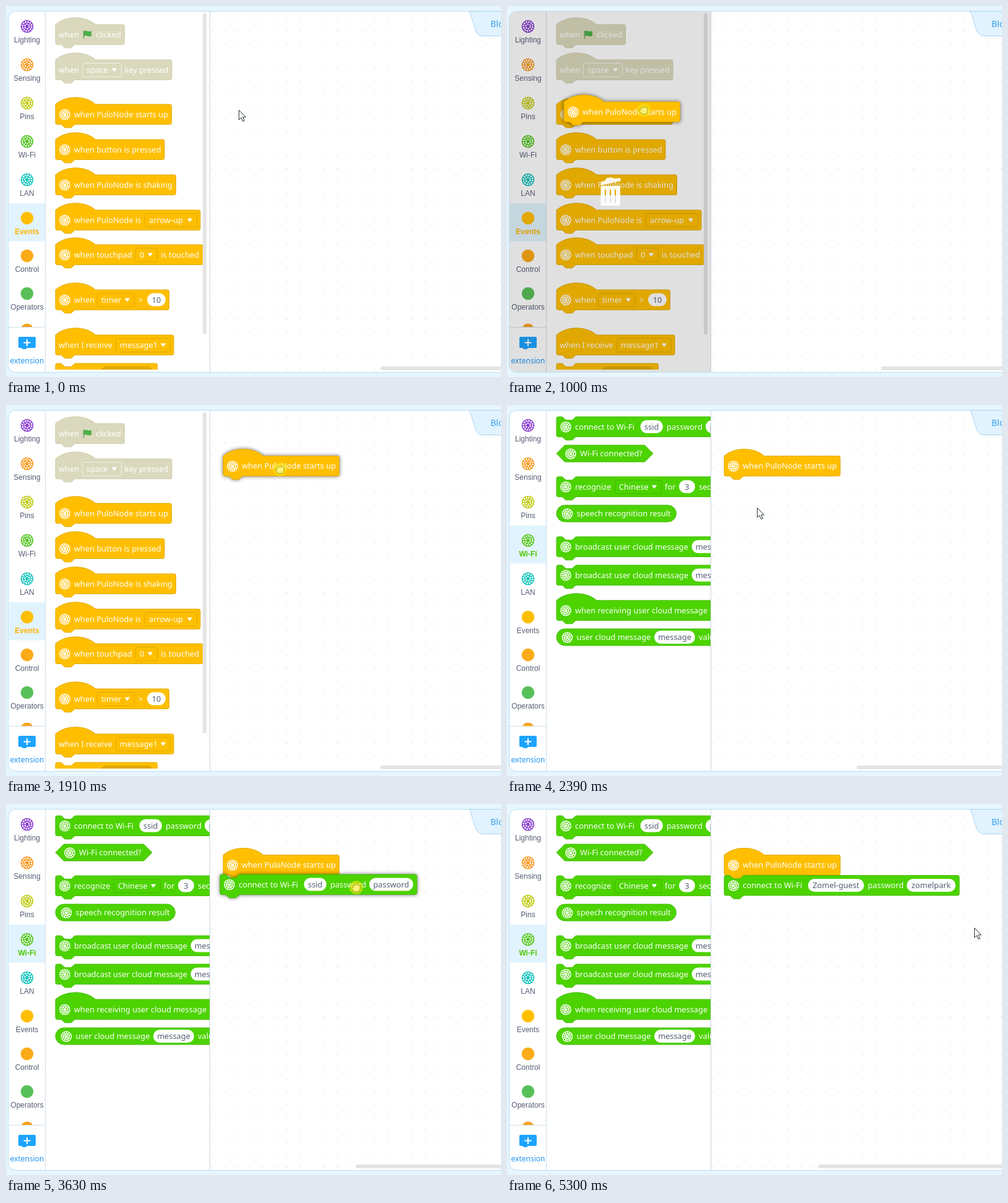
These frames come from a looping animation (800 px wide and 600 px high, 5950 ms). An HTML page:

```html
<!DOCTYPE html>
<html lang="en">
<head>
<meta charset="utf-8">
<title>Block editor</title>
<style>
html, body { margin: 0; width: 100%; height: 100%; overflow: hidden; background: #e7f6fe; }
svg { display: block; width: 800px; height: 600px; }
text { font: 12.8px "Noto Sans", "Open Sans", sans-serif; white-space: pre; }
.side { font: 12px "Liberation Sans", Arial, sans-serif; }
.lift { filter: drop-shadow(0 0 3px rgba(0, 0, 0, .55)); }
</style>
</head>
<body>
<svg id="stage" viewBox="0 0 800 600"></svg>
<script>
const LOOP = 5950;
const ORANGE = { fill: '#ffbf00', line: '#e0a800' };
const GREEN = { fill: '#4cd300', line: '#43bb00' };
const FADED = { fill: '#dad9bd', line: '#cfcdb0' };
const INK = '#575e75';

// Drawing helpers; c is the vertical centre of a row
const label = (x, c, s, fill = '#fff', more = '') =>
  `<text x="${x}" y="${c + 4.5}" fill="${fill}" ${more}>${s}</text>`;

const ring = (x, y, r, w, color, n) => {
  const part = 2 * Math.PI * r / n;
  return `<circle cx="${x}" cy="${y}" r="${r}" fill="none" stroke="${color}" stroke-width="${w}" ` +
    `stroke-dasharray="${part * .62} ${part * .38}"/>`;
};

const badge = (x, y, r, disc, dots) =>
  `<circle cx="${x}" cy="${y}" r="${r}" fill="${disc}"/>` +
  ring(x, y, r * .72, r * .24, dots, 12) + ring(x, y, r * .36, r * .2, dots, 6);

const pill = (x, w, c, s) =>
  `<rect x="${x}" y="${c - 10.5}" width="${w}" height="21" rx="10.5" fill="#fff"/>` +
  label(x + w / 2, c, s, INK, 'text-anchor="middle"');

const menu = (x, right, c, s, col) =>
  `<rect x="${x + .5}" y="${c - 10.5}" width="${right - x - 1}" height="22" rx="3" fill="${col.fill}" ` +
  `stroke="${col === FADED ? '#f3f2e6' : col.line}"/>` + label(x + 7, c, s) +
  `<path d="M${right - 15.5} ${c - 2}h7l-3.5 5z" fill="#fff" stroke="#fff" stroke-width=".8" stroke-linejoin="round"/>`;

const TAB = 'c-2 0-3 1-4 2l-4 4c-1 1-2 2-4 2h-12c-2 0-3-1-4-2l-4-4c-1-1-2-2-4-2h-8a4 4 0 0 1-4-4z';
const TOP = {
  hat: 'M0 0c25-22 71-22 96 0',
  stack: 'M0 4a4 4 0 0 1 4-4h8c2 0 3 1 4 2l4 4c1 1 2 2 4 2h12c2 0 3-1 4-2l4-4c1-1 2-2 4-2'
};

function block(kind, c, right, col, inner) {
  const w = (right - 80) / .675;
  const paint = `fill="${col.fill}" stroke="${col.line}"`;
  let body;
  if (kind === 'round')
    body = `<rect x="80" y="${c - 13.5}" width="${right - 80}" height="27" rx="13.5" ${paint}/>`;
  else if (kind === 'hex')
    body = `<path d="M80 ${c}l13.5-13.5H${right - 13.5}L${right} ${c}l-13.5 13.5H93.5z" ${paint}/>`;
  else
    body = `<path transform="translate(80 ${c - 16}) scale(.675)" ${paint} stroke-width="1.4" ` +
      `d="${TOP[kind]}H${w - 4}a4 4 0 0 1 4 4V44a4 4 0 0 1-4 4H48${TAB}"/>`;
  return body + inner;
}

// Block with the device badge in front of its first words
function device(kind, c, right, col, s, inner = '') {
  const x = { round: 97.5, hex: 103 }[kind] || 95;
  const tx = { round: 112.5, hex: 118 }[kind] || 110;
  return block(kind, c, right, col, badge(x, c + .5, 8.8, '#fff', col.fill) + label(tx, c, s) + inner);
}

function connect(name, nameW, pass, passW) {
  const end = 215.5 + nameW;
  return device('stack', 35, end + 69 + passW + 6, GREEN, 'connect to Wi-Fi',
    pill(215.5, nameW, 35, name) + label(end + 6, 35, 'password') + pill(end + 69, passW, 35, pass));
}

const starter = device('hat', 175, 267.5, ORANGE, 'when PuloNode starts up');
const joinBlank = connect('ssid', 36.5, 'password', 71);

const eventBlocks =
  block('hat', 46, 191.5, FADED, label(85, 46, 'when') + label(145, 46, 'clicked') +
    '<path d="M125.5 40v13" stroke="#6c9a63" stroke-width="1.4"/>' +
    '<path d="M126 40.5c4-2 7 2 12 0v8c-5 2-8-2-12 0z" fill="#4db04a"/>') +
  block('hat', 103, 268, FADED, label(85, 103, 'when') + menu(123, 187, 103, 'space', FADED) + label(191.5, 103, 'key pressed')) +
  starter +
  device('hat', 232, 256, ORANGE, 'when button is pressed') +
  device('hat', 289, 274.5, ORANGE, 'when PuloNode is shaking') +
  device('hat', 346, 314, ORANGE, 'when PuloNode is', menu(224, 309, 346, 'arrow-up', ORANGE)) +
  device('hat', 402, 318.5, ORANGE, 'when touchpad', menu(209, 245, 402, '0', ORANGE) + label(250, 402, 'is touched')) +
  device('hat', 475, 263.5, ORANGE, 'when', menu(147, 208, 475, 'timer', ORANGE) + label(214, 475, '&gt;') + pill(228, 30, 475, '10')) +
  block('hat', 548, 271, ORANGE, label(85, 548, 'when I receive') + menu(177, 266, 548, 'message1', ORANGE)) +
  block('stack', 594, 244.5, ORANGE, '<rect x="152" y="583" width="86" height="21" rx="10" fill="#e0a800"/>') +
  '<rect x="318" y="12" width="6" height="519" rx="3" fill="#e4e4e4"/>';

const cloud = c => device('stack', c, 420, GREEN, 'broadcast user cloud message', pill(298.5, 66, c, 'message'));
const wifiBlocks =
  joinBlank +
  device('hex', 78.5, 236, GREEN, 'Wi-Fi connected?') +
  device('stack', 132, 350, GREEN, 'recognize', menu(174, 250, 132, 'Chinese', GREEN) +
    label(255, 132, 'for') + pill(278, 26, 132, '3') + label(310, 132, 'secs')) +
  device('round', 175.5, 273.5, GREEN, 'speech recognition result') +
  cloud(229) + cloud(275) +
  device('hat', 332, 420, GREEN, 'when receiving user cloud message') +
  device('round', 375.5, 360, GREEN, 'user cloud message', pill(238, 66, 375.5, 'message') + label(310, 375.5, 'value'));

const CATS = [['Lighting', 33, '#8a3fd1'], ['Sensing', 95, '#f8981d'], ['Pins', 157, '#bfcb12'],
  ['Wi-Fi', 219, '#52c41f'], ['LAN', 281, '#16c4bd'], ['Events', 343, '#ffbf00'],
  ['Control', 404, '#fbaa18'], ['Operators', 465, '#59c059']];

function sidebar(chosen) {
  return CATS.map(([name, y, color], i) => {
    const on = name === chosen;
    const look = on ? `fill="${name === 'Wi-Fi' ? '#4cc800' : '#ffb400'}" font-weight="700" style="font-weight:700"` : `fill="${INK}"`;
    return (on ? `<rect x="4.5" y="${y - 24}" width="58.5" height="61.5" fill="#e1f3fe"/>` : '') +
      (i < 5 ? badge(34, y, 10.3, color, '#fff') : `<circle cx="34" cy="${y}" r="10.3" fill="${color}"/>`) +
      `<text class="side" x="34" y="${y + 25.5}" text-anchor="middle" ${look}>${name}</text>`;
  }).join('') + '<path d="M25 519a10.3 10.3 0 0 1 18 0z" fill="#fba21a"/>';
}

const panel = (id, chosen, blocks) =>
  `<g id="${id}">${sidebar(chosen)}<g clip-path="url(#shelf)">${blocks}</g></g>`;

const stage = document.getElementById('stage');
stage.innerHTML = `
<defs>
  <clipPath id="shelf"><rect x="64" y="10" width="265" height="578"/></clipPath>
  <pattern id="dots" x="331.5" y="19" width="20.25" height="20.25" patternUnits="userSpaceOnUse">
    <rect x=".5" y=".5" width="1.6" height="1.6" fill="#dedede"/>
  </pattern>
</defs>
<rect width="800" height="600" fill="#e7f6fe"/>
<rect x="3.5" y="8.5" width="830" height="584" rx="12" fill="#fff" stroke="#b9dcf4"/>
<rect x="330" y="10" width="470" height="581" fill="url(#dots)"/>
<path d="M748 8.5c3 3 5 12 9 25 4 11 6 15 15 15H810V8.5z" fill="#e1f3fe" stroke="#a9d3f2"/>
<text x="783" y="33.5" style="font-size:14px" fill="#3c9fe8">Blocks</text>
<rect id="bar" x="605" y="583" width="400" height="6" rx="3" fill="#e4e4e4"/>
${panel('events', 'Events', eventBlocks)}
${panel('wifi', 'Wi-Fi', wifiBlocks)}
<path d="M63.5 9v583M4 519.5h59" stroke="#cfdfea"/>
<path d="M329.5 9v583" stroke="#c9d6df"/>
<path d="M22 535h24a2 2 0 0 1 2 2v14a2 2 0 0 1-2 2H34l-2 2h-5l-2-2h-3a2 2 0 0 1-2-2v-14a2 2 0 0 1 2-2z" fill="#1ea4ff"/>
<path d="M28.5 544.5h11M34 539v11" stroke="#fff" stroke-width="2"/>
<text x="34" y="578" style="font-size:12px" text-anchor="middle" fill="#2196f3">extension</text>
<path id="dim" d="M4 21a12 12 0 0 1 12-12H329.5V592H16a12 12 0 0 1-12-12z" opacity=".12"/>
<g id="trash" fill="#fff" opacity=".92">
  <path fill-rule="evenodd" d="M151.500 291H183v29a3 3 0 0 1-3 3h-25.500a3 3 0 0 1-3-3zM158 297v21h2v-21zm8 0v21h2v-21zm8 0v21h2v-21z"/>
  <path d="M151 285l8-3 1-3q5-3 11-1l2 1 10-1 1 5-32 7z"/>
</g>
<g id="hat">${starter}</g>
<g id="join">
  <g>${joinBlank}</g>
  <g>${connect('Zomel-guest', 90.5, 'password', 71)}</g>
  <g>${connect('Zomel-guest', 90.5, 'zomelpark', 79)}</g>
</g>
<g id="cursor">
  <path id="arrow" d="M.5.5v15.500l3.600-3.400 2.600 5.900 2.600-1.100-2.600-5.700h4.800z" fill="#fff" stroke="#24352f"/>
  <path id="hand" d="M-5-2q1.500-3 3-1.500 1.200-2.500 3-.5 2-1.500 3 .8 2.300-.6 2.400 2 .2 4-2.400 8h-7q-2-3-4-5-.8-2.500 2-1.800z" fill="#fff" stroke="#5a4a18"/>
  <path id="beam" d="M-2.500-7q2 0 2.500 1.500Q.5-7 2.500-7M0-5.500v11M-2.500 7q2 0 2.500-1.500Q.5 7 2.500 7" fill="none" stroke="#333"/>
  <circle id="press" r="11" fill="#f5e616" opacity=".58"/>
</g>`;

const TICKS = [0, 140, 240, 330, 430, 520, 620, 710, 790, 900, 1000, 1070, 1160, 1260, 1360,
  1460, 1550, 1640, 1740, 1910, 1980, 2050, 2130, 2200, 2390, 2470, 2550, 2630, 2720, 2800, 2880, 2960,
  3060, 3160, 3250, 3340, 3440, 3530, 3630, 3710, 3810, 3900, 4000, 4100,
  4290, 4380, 4470, 4570, 4660, 4750, 4930, 5180, 5220, 5260, 5300];

// Tracks hold [time, x, y]
const POINTER = [[0, 376, 168], [60, 376, 168], [710, 210, 170], [900, 212, 170], [1000, 221, 168],
  [1260, 366, 132], [1360, 392, 120], [1740, 430, 106], [1910, 443, 104], [1980, 443, 104],
  [2200, 459, 125], [2390, 404, 166], [2960, 302, 40], [3060, 318, 66], [3160, 369, 130],
  [3630, 566, 135], [3710, 571, 136], [4100, 556, 150], [4290, 540, 145], [4470, 513, 132],
  [4570, 513, 132], [4660, 690, 134], [4750, 699, 134], [4930, 726, 159], [5100, 726, 159], [5300, 755, 200]];
const HAT = [[790, 0, 0], [900, 4, -1], [1000, 12, -4], [1260, 194, -48], [1360, 220, -58], [1740, 258, -74], [1910, 271, -76.5]];
const JOIN = [[2960, 0, 0], [3060, 18, 26], [3160, 69, 90], [3630, 266, 95], [3710, 271, 96.5]];
const MODES = [[0, 'arrow'], [520, 'hand'], [790, 'grab'], [1980, 'arrow'], [2720, 'hand'], [2960, 'grab'],
  [3710, 'arrow'], [4380, 'beam'], [4470, 'type'], [4930, 'arrow']];
const BAR = [[0, 605], [1980, 565], [3710, 514], [4570, 505], [4750, 503]];

const $ = id => document.getElementById(id);
const show = (el, on) => el.setAttribute('display', on ? 'inline' : 'none');
const move = (el, [x, y]) => el.setAttribute('transform', `translate(${x} ${y})`);
const held = (list, t) => list.filter(k => k[0] <= t).pop()[1];

function along(track, t) {
  const i = track.findIndex(k => k[0] > t);
  if (i === 0) return track[0].slice(1);
  if (i < 0) return track[track.length - 1].slice(1);
  const [a, ax, ay] = track[i - 1], [b, bx, by] = track[i];
  const p = (t - a) / (b - a);
  return [ax + (bx - ax) * p, ay + (by - ay) * p];
}

function draw(time) {
  const t = TICKS.filter(k => k <= time).pop();
  const at = along(POINTER, t), mode = held(MODES, t);
  const dragHat = t >= 900 && t < 1980, dragJoin = t >= 3060 && t < 3710;
  const dim = (dragHat || dragJoin) && at[0] < 329;

  show($('events'), t < 2390);
  show($('wifi'), t >= 2390);
  show($('dim'), dim);
  show($('trash'), dim || (t >= 1160 && t < 1550));
  $('bar').setAttribute('x', held(BAR, t));

  show($('hat'), t >= 900);
  move($('hat'), along(HAT, t));
  $('hat').setAttribute('class', dragHat ? 'lift' : '');
  show($('join'), t >= 3060);
  move($('join'), along(JOIN, t));
  $('join').setAttribute('class', dragJoin ? 'lift' : '');
  const filled = t < 4570 ? 0 : t < 4750 ? 1 : 2;
  [...$('join').children].forEach((g, i) => show(g, i === filled));

  move($('cursor'), at);
  show($('arrow'), mode === 'arrow');
  show($('hand'), mode === 'hand' || mode === 'grab');
  show($('beam'), mode === 'beam' || mode === 'type');
  show($('press'), mode === 'grab' || mode === 'type');
}

const start = performance.now();
function loop() {
  draw((performance.now() - start) % LOOP);
  requestAnimationFrame(loop);
}
loop();
</script>
</body>
</html>
```
